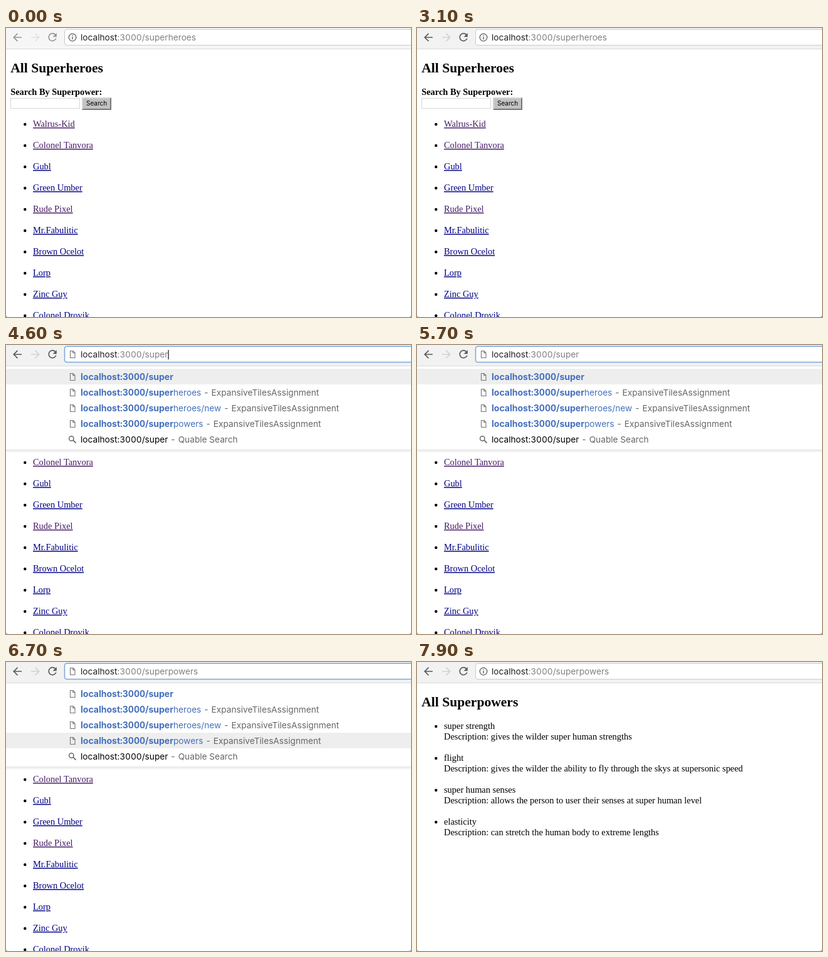
Write an HTML page that moves like this. It is 646 by 462 pixels and loops after 8 s.

```html
<!DOCTYPE html>
<html lang="en">
<head>
<meta charset="utf-8">
<title>Superheroes</title>
<style>
  html, body { margin: 0; width: 100%; height: 100%; overflow: hidden; background: #fff; }
  svg { display: block; }
  text { white-space: pre; }
  .serif { font: 14.4px "Liberation Serif", serif; fill: #000; }
  .title { font: bold 21.6px "Liberation Serif", serif; }
  .ui { font: 13.7px Inter, sans-serif; font-feature-settings: "calt" 0, "tnum" 1; }
  .bold { font-weight: 700; }
  .ui .bold { font-size: 14.03px; }
  .link { fill: #000086; text-decoration: underline; }
  .seen { fill: #461b66; }
  .blue { fill: #4470bd; }
  .grey { fill: #666; }
  .tick { font-family: "DejaVu Sans", sans-serif; }
</style>
</head>
<body>
<svg id="stage" width="646" height="462" viewBox="0 0 646 462">
  <g id="page"></g>
  <g id="bar"></g>
  <g id="menu"></g>
  <path d="M0 459Q0 462 3 462H0ZM646 459Q646 462 643 462H646Z" fill="#777"/>
</svg>
<script>
const LOOP = 8000, BLINK = 560;
const HOST = 'localhost', BASE = HOST + ':3000/';
const SITE = 'ExpansiveTilesAssignment', ENGINE = 'Quable';
const heroes = ['Walrus-Kid', 'Colonel Tanvora', 'Gubl', 'Green Umber', 'Rude Pixel',
  'Mr.Fabulitic', 'Brown Ocelot', 'Lorp', 'Zinc Guy', 'Colonel Drovik'];
const visited = [0, 1, 4];
const powers = [
  ['super strength', 'gives the wilder super human strengths'],
  ['flight', 'gives the wilder the ability to fly through the skys at supersonic speed'],
  ['super human senses', 'allows the person to user their senses at super human level'],
  ['elasticity', 'can stretch the human body to extreme lengths']
];

const $ = id => document.getElementById(id);
const esc = s => s.replace(/&/g, '&amp;');
const text = (x, y, cls, s) => `<text x="${x}" y="${y}" class="${cls}">${s}</text>`;
const span = (cls, s) => `<tspan class="${cls}">${esc(s)}</tspan>`;
const rect = (x, y, w, h, fill) => `<rect x="${x}" y="${y}" width="${w}" height="${h}" fill="${fill}"/>`;
const line = (d, color, w) => `<path d="${d}" fill="none" stroke="${color}" stroke-width="${w}"/>`;
const dot = y => `<circle cx="30.3" cy="${y}" r="2.2"/>`;

// Each step: start time and what changes from there on.
const steps = [];
let state = { path: 'superheroes', page: 'heroes' };
function at(time, change) {
  state = { ...state, ...change };
  steps.push({ time, ...state });
}
at(0, {});
at(500, { active: true });
at(1400, { focus: true, sel: true });
at(2100, { focus: false, sel: false });
at(3500, { focus: true, sel: true });
at(3800, { sel: false, caret: true });
at(4000, { path: 'superheroe', typed: 'superheroe', pick: 0 });
for (let n = 9; n > 4; n--) {
  const p = 'superheroe'.slice(0, n);
  at(4200 + (9 - n) * 100, { path: p, typed: p });
}
at(5800, { path: 'superheroes', pick: 1 });
at(5950, { path: 'superheroes/new', pick: 2 });
at(6100, { path: 'superpowers', pick: 3 });
at(7600, { focus: false, caret: false, typed: '', page: 'powers' });

function heroPage() {
  const list = heroes.map((name, i) => {
    const y = 158 + 34 * i;
    return dot(y - 4) + text(43, y, 'serif link' + (visited.includes(i) ? ' seen' : ''), name);
  }).join('');
  return text(7.2, 71, 'title', 'All Superheroes') +
    text(7.2, 107, 'serif bold', 'Search By Superpower:') +
    '<rect x="7.5" y="112.5" width="110" height="16" fill="#fff" stroke="#d6d6d6"/>' +
    rect(121, 111, 47, 20, '#777') +
    '<path d="M121 131V111H168L166 113H123V129Z" fill="#d4d4d4"/>' +
    rect(123, 113, 43, 16, '#c2c2c2') +
    '<text x="128" y="124.4" class="ui" style="font-size:10px">Search</text>' + list;
}

function powerPage() {
  return text(7.2, 71, 'title', 'All Superpowers') + powers.map(([name, info], i) => {
    const y = 107 + 51 * i;
    return dot(y - 4) + text(43, y, 'serif', name) + text(43, y + 17, 'serif', 'Description: ' + info);
  }).join('');
}

function sheet(y) {
  return line(`M102.5 ${y - 5.5}H107L110 ${y - 2.5}V${y + 5.5}H102.5ZM106.8 ${y - 5.5}V${y - 2.3}H110`, '#757575', 1.1);
}

function lens(y) {
  return `<circle cx="104.3" cy="${y - 1.5}" r="3.7" fill="none" stroke="#6b6b6b" stroke-width="1.5"/>` +
    line(`M107 ${y + 1.2}L111.5 ${y + 5.7}`, '#6b6b6b', 1.8);
}

function toolbar(s) {
  const ink = s.active ? '#5a5a5a' : '#969696';
  const pale = s.active ? '#d2d2d2' : '#e2e2e2';
  const rest = s.sel ? '#64819f' : '#808080';
  const edge = s.focus ? '#7aa6dc' : '#cacaca';
  const info = '<circle cx="106" cy="15" r="5.8" fill="none" stroke="#5f5f5f" stroke-width="1.3"/>' +
    rect(105.3, 14, 1.4, 4.2, '#5f5f5f') + rect(105.3, 11.6, 1.4, 1.4, '#5f5f5f');
  return rect(0, 0, 646, 33, s.active ? '#f2f2f2' : '#f6f6f6') + rect(0, 33, 646, 1, '#d9d9d9') +
    line('M25 15H12.5M18.5 8.8L12.3 15L18.5 21.2', ink, 1.7) +
    line('M40 15H52.5M46.5 8.8L52.7 15L46.5 21.2', pale, 1.7) +
    line('M78.6 10.6A6 6 0 1 0 79.8 16.8', ink, 1.7) +
    `<path d="M80.8 8V14.2H74.6Z" fill="${ink}"/>` +
    `<rect x="93.5" y="2.3" width="560" height="25.2" rx="3.5" fill="#fff" stroke="${edge}" stroke-width="${s.focus ? 1.5 : 1}"/>` +
    (s.typed ? sheet(15) : info) +
    '<rect id="mark" x="119" y="7" height="17" fill="#afd1f8" visibility="hidden"/>' +
    `<text id="url" x="119" y="20.4" class="ui"><tspan fill="#202020">${HOST}</tspan><tspan fill="${rest}">:3000/${s.path}</tspan></text>` +
    '<rect id="caret" y="8" width="1.2" height="15" fill="#111" visibility="hidden"/>';
}

function hits(p) {
  const start = span('blue bold', BASE + p);
  const hit = (full, note = '') => start + span('blue', full.slice(p.length)) + note;
  const site = span('grey', ' - ' + SITE);
  const find = span('', BASE + p) + span('grey', ` - ${ENGINE} Search`);
  const rows = [start, hit('superheroes', site), hit('superheroes/new', site)];
  if (p === 'super') return [...rows, hit('superpowers', site), find];
  const first = span('grey', ' - ') + span('grey bold', BASE + p) + span('grey', 'superheroes/1'.slice(p.length));
  const query = hit('superheroes?utf8=') + span('blue tick', '✔') +
    span('blue', '&search=super+human+sense&commit=Search');
  return [...rows, hit('superheroes/1', first), find, query];
}

function dropdown(s) {
  if (!s.typed) return '';
  const rows = hits(s.typed), end = 42 + rows.length * 25;
  const shade = [.09, .07, .055, .04, .02].map((a, i) => rect(0, end + i, 646, 1, `rgba(0,0,0,${a})`)).join('');
  return rect(0, 34, 646, end - 34, '#fff') + shade +
    rect(0, 38 + 25 * s.pick, 646, 25, '#eee') +
    rows.map((row, i) => {
      const y = 51 + 25 * i;
      return (row.includes(ENGINE) ? lens(y) : sheet(y)) + text(119, y + 5, 'ui', row);
    }).join('');
}

let shown = null;
function draw(time) {
  const t = time % LOOP;
  const s = steps.filter(step => step.time <= t).pop();
  if (s !== shown) {
    shown = s;
    $('page').innerHTML = s.page === 'heroes' ? heroPage() : powerPage();
    $('bar').innerHTML = toolbar(s);
    $('menu').innerHTML = dropdown(s);
  }
  const width = $('url').getComputedTextLength();
  const lit = s.caret && (t - s.time) % (2 * BLINK) < BLINK;
  $('mark').setAttribute('width', width);
  $('mark').setAttribute('visibility', s.sel ? 'visible' : 'hidden');
  $('caret').setAttribute('x', 119 + width);
  $('caret').setAttribute('visibility', lit ? 'visible' : 'hidden');
}

const begin = performance.now();
function tick() {
  draw(performance.now() - begin);
  requestAnimationFrame(tick);
}
tick();
</script>
</body>
</html>
```
